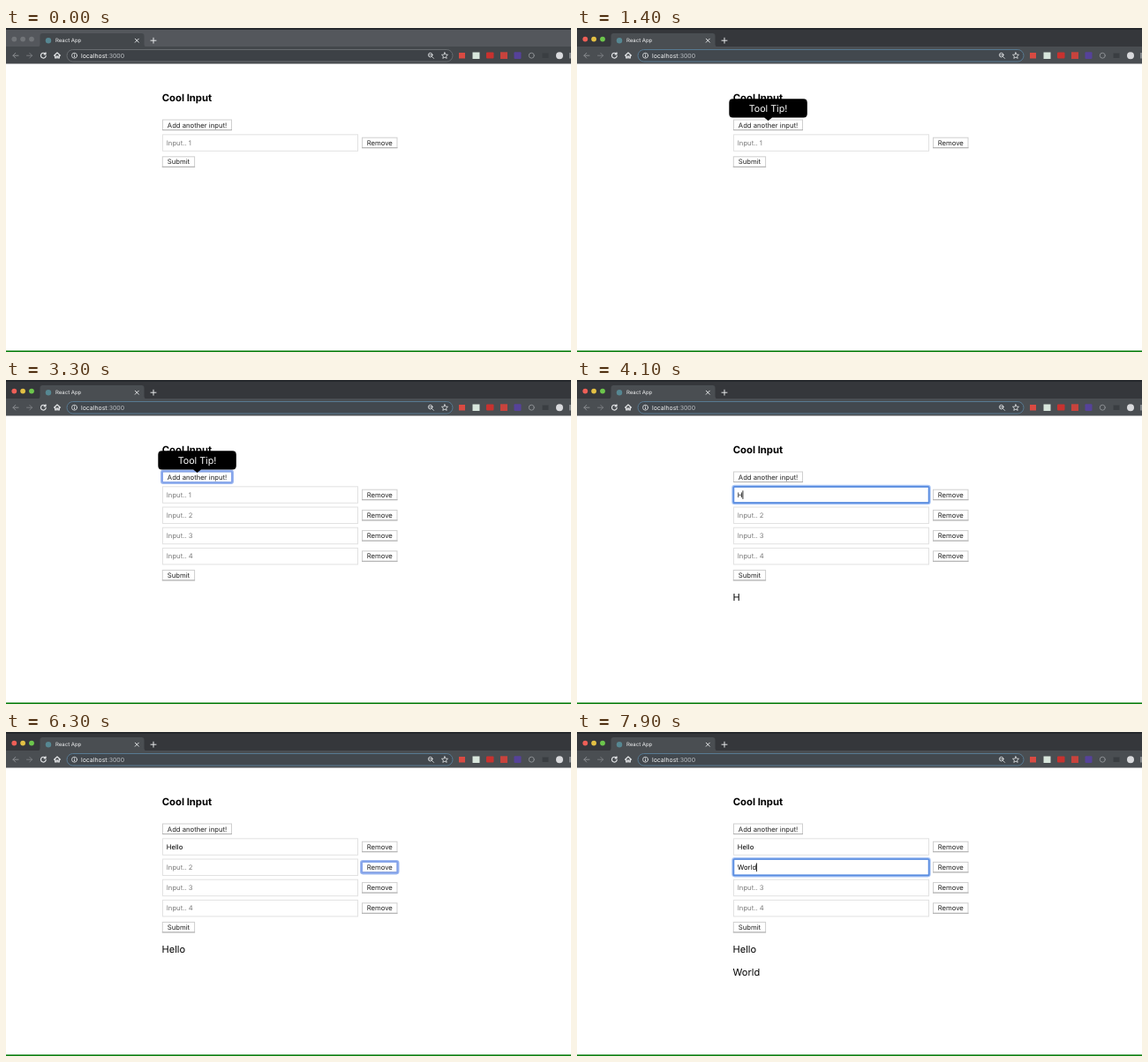
An HTML page that plays this animation: 640 px wide and 367 px high, repeating every 8 s.

```html
<!DOCTYPE html>
<html lang="en">
<head>
<meta charset="utf-8">
<title>Cool Input</title>
<style>
  html, body { margin: 0; width: 100%; height: 100%; overflow: hidden; background: #fff; }
  svg { display: block; width: 640px; height: 367px; font-family: Inter, "Liberation Sans", sans-serif; font-size: 7.7px;
    text-rendering: geometricPrecision;
    --strip: #35373b; --bar: #4a4e52; --pill: #42484e; --rim: #587a92; --host: #f4f5f6; --red: #ee5f57; --yellow: #e3c044; --green: #6cc64c; }
  svg.idle { --strip: #54575c; --bar: #43474b; --pill: #3d4146; --rim: #686c70; --host: #fff; --red: #717478; --yellow: #717478; --green: #717478; }
  .strip { fill: var(--strip); }
  .bar { fill: var(--bar); }
  .pill { fill: var(--pill); stroke: var(--rim); }
  .line { fill: none; stroke: #e4e6e8; stroke-linecap: round; stroke-linejoin: round; }
  .dim { stroke: #8b8e92; }
  .hint { fill: #7b7b7b; }
</style>
</head>
<body>
<svg id="stage" class="idle" viewBox="0 0 640 367">
  <g id="browser">
    <rect class="strip" width="640" height="22"/>
    <rect width="640" height="2" fill="#25282c"/>
    <path class="bar" d="M35 21.5Q38.500 21.500 38.500 18V9Q38.500 6 41.500 6H153.500Q156.500 6 156.500 9V18Q156.500 21.500 160 21.500Z"/>
    <rect class="bar" y="21" width="640" height="19.500"/>
    <circle cx="9.300" cy="12.600" r="2.900" fill="var(--red)"/>
    <circle cx="19.100" cy="12.600" r="2.900" fill="var(--yellow)"/>
    <circle cx="29" cy="12.600" r="2.900" fill="var(--green)"/>
    <circle cx="48" cy="14.200" r="3.200" fill="#568792"/>
    <text x="56" y="16.400" font-size="6" fill="#f1f2f3">React App</text>
    <path class="line" d="M146.300 12.200l4 4m0-4l-4 4M164 14.200h6m-3-3v6"/>
    <path class="line dim" d="M14 31.200H8m2.700-2.800L8 31.200l2.700 2.800"/>
    <path class="line dim" stroke-opacity=".7" d="M23.500 31.200h6m-2.700-2.800l2.700 2.800-2.700 2.800"/>
    <path class="line" stroke-width="1.200" d="M44.600 29.300A2.900 2.900 0 1 0 45.200 31.700M45 27.900V29.800H43"/>
    <path class="line" stroke-width="1.200" d="M54.500 31.200L58 28l3.500 3.200M55.700 30.800V34h1.500v-2h1.600v2h1.500v-3.200"/>
    <rect class="pill" x="69" y="24.500" width="437" height="13.500" rx="6.750"/>
    <circle class="line" cx="77.500" cy="31.200" r="3" stroke-width=".8"/>
    <path class="line" stroke-width=".9" d="M77.500 31v1.800M77.500 29.500v.1"/>
    <text x="85" y="33.700" font-size="6.950" fill="#b9bdc1"><tspan fill="var(--host)">localhost</tspan>:3000</text>
    <circle class="line" cx="480.700" cy="30.600" r="2.300" stroke-width=".9"/>
    <path class="line" stroke-width=".8" d="M482.600 32.500l1.900 1.900M479.700 30.600h2"/>
    <path class="line" stroke-width=".8" d="M497 27.800l1 2.300 2.500.2-1.900 1.700.6 2.400-2.200-1.300-2.200 1.300.6-2.400-1.900-1.700 2.500-.2Z"/>
    <rect x="513" y="28" width="7" height="6.500" fill="#d94a42"/>
    <rect x="528.500" y="27.500" width="8" height="7.500" fill="#d8e6dc"/>
    <rect x="544" y="27.500" width="8.500" height="7" rx="1" fill="#c8322f"/>
    <rect x="560" y="27.300" width="8" height="7.700" fill="#c8433d"/>
    <rect x="575.500" y="27.300" width="8" height="7.700" rx="1" fill="#56429a"/>
    <circle class="line dim" cx="595.300" cy="31.200" r="3"/>
    <rect x="607.500" y="28.500" width="7" height="5.500" fill="#3a3e42"/>
    <circle cx="627" cy="31.200" r="4" fill="#d9dadd"/>
    <path d="M639 28v6.500" stroke="#c4c7ca"/>
  </g>
  <g id="page">
    <text x="176.700" y="83.300" font-size="11.300" font-weight="700">Cool Input</text>
  </g>
  <g id="tip">
    <path d="M176.500 80.300H256.500Q260.800 80.300 260.800 84.600V97.300Q260.800 101.500 256.500 101.500H221L216.600 105L212.200 101.500H176.500Q172.300 101.500 172.300 97.300V84.600Q172.300 80.300 176.500 80.300Z"/>
    <text x="216.500" y="95" font-size="10.700" fill="#fff" text-anchor="middle">Tool Tip!</text>
  </g>
  <rect y="365.400" width="640" height="1.600" fill="#087d0c"/>
</svg>
<script>
const LOOP = 8000, PITCH = 23.2, BLINK = 500;
const stage = document.getElementById("stage");
const page = document.getElementById("page");
const tip = document.getElementById("tip");

// [time, value]: the last step reached applies
const rowSteps = [[0, 1], [1700, 2], [2500, 3], [3100, 4]];
const focusSteps = [[0, ""], [1600, "add"], [3500, "input0"], [5200, "remove0"],
  [5400, "input1"], [6300, "remove1"], [6600, "input1"]];
const typed = [
  { word: "Hello", keys: [4000, 4300, 4500, 4700, 4900] },
  { word: "World", keys: [7000, 7300, 7500, 7700, 7800] }
];

function add(parent, tag, attrs, text) {
  const el = document.createElementNS("http://www.w3.org/2000/svg", tag);
  for (const name in attrs) el.setAttribute(name, attrs[name]);
  if (text) el.textContent = text;
  parent.appendChild(el);
  return el;
}

function show(el, on) { el.style.display = on ? "" : "none"; }

function addRing(parent, x, y, width, height, colors) {
  const ring = add(parent, "g", { fill: "none" });
  add(ring, "rect", { x: x - .5, y: y - .5, width: width + 1, height: height + 1, rx: 1.8,
    stroke: colors[0], "stroke-width": 3 });
  add(ring, "rect", { x, y, width, height, rx: 1, stroke: colors[1], "stroke-width": 1.7 });
  return ring;
}

function addButton(parent, x, y, width, label) {
  const group = add(parent, "g", {});
  add(group, "rect", { x: x + .5, y: y + .5, width: width - 1, height: 11.5, fill: "#fff", stroke: "#cfcfcf" });
  add(group, "path", { d: `M${x} ${y + 12}h${width}`, stroke: "#b0b0b0" });
  const ring = addRing(group, x, y, width, 12.5, ["#9fb9f0", "#83a2ea"]);
  add(group, "text", { x: x + width / 2, y: y + 9, "text-anchor": "middle", fill: "#222" }, label);
  return { group, ring };
}

function addRow(i) {
  const y = 121 + i * PITCH;
  const group = add(page, "g", {});
  add(group, "rect", { x: 177.5, y: y - .2, width: 221, height: 18.5, fill: "#fff", stroke: "#e2e2e2" });
  const ring = addRing(group, 177.3, y - .2, 221.4, 18.4, ["#a9c5f5", "#5a8de0"]);
  const text = add(group, "text", { x: 181.8, y: y + 11.6 });
  const caret = add(group, "rect", { y: y + 4.3, width: .8, height: 9.6 });
  const remove = addButton(group, 403, y + 2.7, 40.5, "Remove");
  const echo = add(page, "text", { x: 176.6, y: 250.4 + i * 25.5, "font-size": 11 });
  return { group, ring, text, caret, remove, echo };
}

const addMore = addButton(page, 177, 103.5, 79, "Add another input!");
const submit = addButton(page, 176.8, 145.3, 37.3, "Submit");
const rows = [0, 1, 2, 3].map(addRow);
show(submit.ring, false);

function stepAt(steps, t) {
  return steps.filter(step => step[0] <= t).pop();
}

const clamp = v => Math.max(0, Math.min(1, v));

function drawRow(row, i, t, focus, since) {
  const entry = typed[i];
  const hits = entry ? entry.keys.filter(key => key <= t) : [];
  const value = entry ? entry.word.slice(0, hits.length) : "";
  const active = focus === "input" + i;
  const lastEvent = Math.max(since, ...hits);

  row.text.textContent = value || "Input.. " + (i + 1);
  row.text.setAttribute("class", value ? "" : "hint");
  row.echo.textContent = value;
  show(row.ring, active);
  show(row.remove.ring, focus === "remove" + i);
  show(row.caret, active && Math.floor((t - lastEvent) / BLINK) % 2 === 0);
  if (active) {
    const width = value ? row.text.getComputedTextLength() : 0;
    row.caret.setAttribute("x", 181.8 + width);
  }
}

function draw(t) {
  const count = stepAt(rowSteps, t)[1];
  const [since, focus] = stepAt(focusSteps, t);
  stage.classList.toggle("idle", t < 100);
  show(addMore.ring, focus === "add");
  submit.group.setAttribute("transform", `translate(0 ${(count - 1) * PITCH})`);
  tip.style.opacity = clamp((t - 1050) / 300) * clamp((3600 - t) / 250);
  rows.forEach((row, i) => {
    show(row.group, i < count);
    if (i < count) drawRow(row, i, t, focus, since);
    else row.echo.textContent = "";
  });
}

const start = performance.now();
function tick() {
  draw((performance.now() - start) % LOOP);
  requestAnimationFrame(tick);
}
tick();
</script>
</body>
</html>
```
